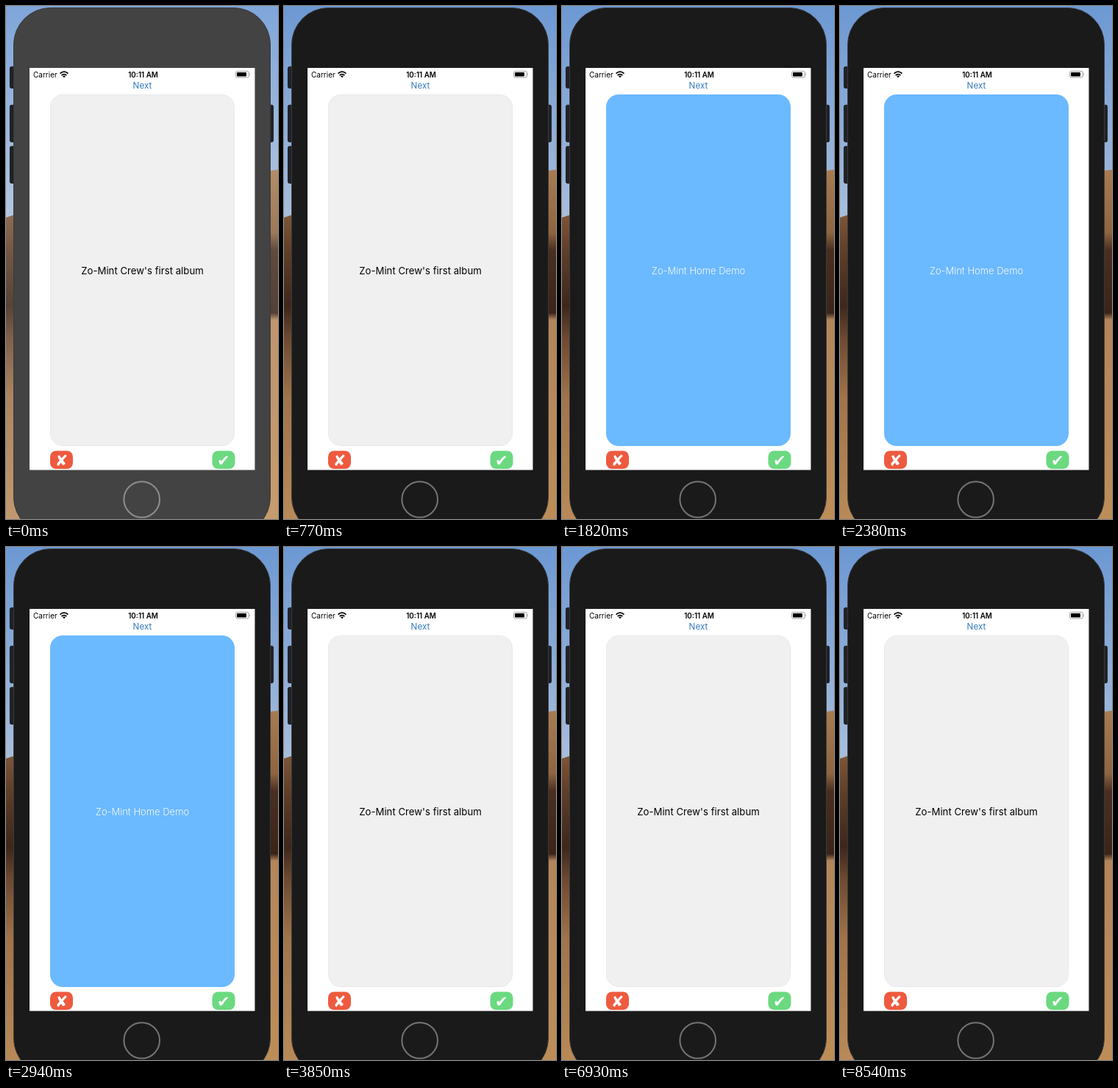
These frames come from a looping animation (370x696 px, 8610 ms). An HTML page:

```html
<!DOCTYPE html>
<html lang="en">
<head>
<meta charset="utf-8">
<title>Flip card</title>
<style>
  html, body { margin: 0; width: 100%; height: 100%; overflow: hidden; }
  #stage { position: relative; width: 370px; height: 696px; overflow: hidden; font-family: Inter, sans-serif; }
  svg { position: absolute; inset: 0; }
  #screen { position: absolute; left: 32px; top: 84px; width: 306px; height: 545px; overflow: hidden; }
  .card {
    position: absolute; left: 28px; top: 36px; width: 251px; height: 477px;
    box-sizing: border-box; border-radius: 17px; backface-visibility: hidden;
    display: flex; align-items: center; justify-content: center; white-space: nowrap;
  }
  #front { background: #f0f0f0; border: 1px solid #e9e9e9; color: #000; font-size: 13.2px; }
  #back { background: #6bb9ff; color: #f4f9ff; font-size: 13px; font-weight: 300; }
  .mark { font: 21px "DejaVu Sans", sans-serif; fill: #fff; text-anchor: middle; }
</style>
</head>
<body>
<div id="stage">
  <svg width="370" height="696" viewBox="0 0 370 696">
    <defs>
      <linearGradient id="sky" x2="0" y2="1">
        <stop offset="0" stop-color="#6c98d3"/>
        <stop offset="1" stop-color="#a9bedb"/>
      </linearGradient>
      <linearGradient id="leftDune" x2="0" y2="1">
        <stop offset="0" stop-color="#7d5638"/>
        <stop offset=".12" stop-color="#5f3f29"/>
        <stop offset=".3" stop-color="#3d271b"/>
        <stop offset=".4" stop-color="#6b4830"/>
        <stop offset=".6" stop-color="#a0744a"/>
        <stop offset="1" stop-color="#b98a58"/>
      </linearGradient>
      <linearGradient id="rightDune" x2="0" y2="1">
        <stop offset="0" stop-color="#a87c52"/>
        <stop offset=".18" stop-color="#8f6541"/>
        <stop offset=".23" stop-color="#4a2f20"/>
        <stop offset=".41" stop-color="#3a2419"/>
        <stop offset=".43" stop-color="#b4855a"/>
        <stop offset="1" stop-color="#bd8d58"/>
      </linearGradient>
    </defs>

    <rect width="370" height="290" fill="url(#sky)"/>
    <path d="M0 287L12 283V696H0z" fill="url(#leftDune)"/>
    <path d="M12 660H190V696H12z" fill="#b98a58"/>
    <path d="M355 224L370 222V696H190V660H355z" fill="url(#rightDune)"/>
    <rect id="glow" width="370" height="696" fill="#fff"/>

    <g fill="#202226" stroke="#111" stroke-width=".8">
      <rect x="5.4" y="82.4" width="8" height="29" rx="2"/>
      <rect x="5.4" y="134.4" width="8" height="50" rx="2"/>
      <rect x="5.4" y="190.4" width="8" height="50" rx="2"/>
      <rect x="356" y="134.4" width="7.6" height="50" rx="2"/>
    </g>
    <rect id="bezel" x="10.5" y="2.5" width="349" height="714" rx="50" stroke="#37383a"/>
    <circle id="home" cx="184.7" cy="669.5" r="24.3" fill="none" stroke-width="2"/>

    <rect x="32" y="84" width="306.5" height="545.5" fill="#fff"/>
    <text x="37" y="96.5" font-size="10">Carrier</text>
    <g fill="none" stroke="#000" stroke-width="1.7">
      <path d="M73.5 91.6Q79 86.8 84.5 91.6"/>
      <path d="M75.6 94Q79 91.1 82.4 94"/>
    </g>
    <path d="M77 95.3Q79 93.8 81 95.3L79 97.3z"/>
    <text x="186.5" y="96.5" font-size="9.8" font-weight="600" text-anchor="middle">10:11 AM</text>
    <rect x="312.5" y="88.5" width="18" height="8.5" rx="2.3" fill="none" stroke="#888" stroke-width=".8"/>
    <rect x="314" y="90" width="13" height="5.5" rx="1"/>
    <path d="M331.6 91.2Q333 92.7 331.6 94.2z" fill="#888"/>
    <text x="185.5" y="112" font-size="11.7" text-anchor="middle" fill="#3478b8">Next</text>

    <rect x="60" y="603.5" width="31" height="24.5" rx="8" fill="#ee5a3f"/>
    <text class="mark" x="75.5" y="623.5">✘</text>
    <rect x="280.5" y="603.5" width="31" height="24.5" rx="8" fill="#6bd980"/>
    <text class="mark" x="295.8" y="623.5">✔</text>
  </svg>
  <div id="screen">
    <div class="card" id="front">Zo-Mint Crew's first album</div>
    <div class="card" id="back">Zo-Mint Home Demo</div>
  </div>
</div>
<script>
  const LOOP = 8610;
  const FRAME = 70;
  const $ = id => document.getElementById(id);
  const clamp = x => Math.min(1, Math.max(0, x));
  const progress = (t, start, end) => clamp((t - start) / (end - start));
  const easeInOut = x => x * x * (3 - 2 * x);
  const gray = v => `rgb(${v},${v},${v})`;
  const mix = (a, b, x) => Math.round(a + (b - a) * x);

  function draw(t) {
    const dim = progress(t, 0, 280);
    $('bezel').setAttribute('fill', gray(mix(67, 26, dim)));
    $('home').setAttribute('stroke', gray(mix(142, 116, dim)));
    $('glow').setAttribute('opacity', 0.13 * (1 - dim));

    const turn = easeInOut(progress(t, 980, 1400)) - easeInOut(progress(t, 3010, 3430));
    const rotate = angle => `perspective(1000px) rotateY(${angle}deg)`;
    $('front').style.transform = rotate(180 * turn);
    $('back').style.transform = rotate(180 + 180 * turn);
  }

  function tick() {
    const t = performance.now() % LOOP;
    draw(Math.floor(t / FRAME) * FRAME);
    requestAnimationFrame(tick);
  }
  tick();
</script>
</body>
</html>
```
